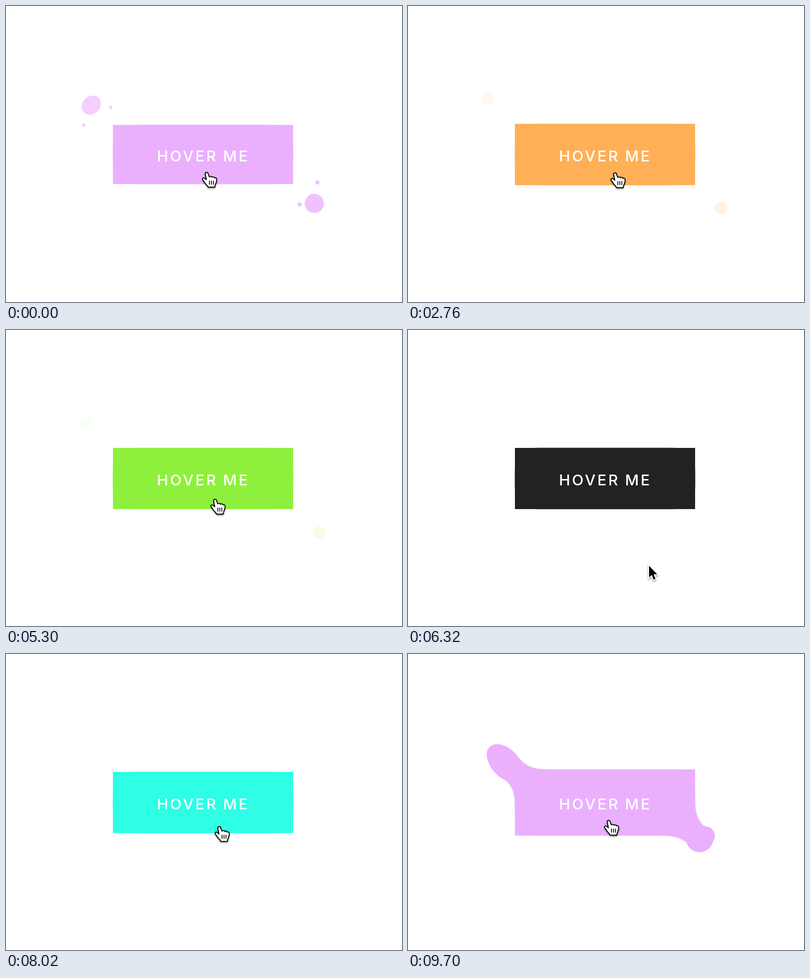
These frames come from a looping animation (800x600 px, 9.72 s). An HTML page:

```html
<!DOCTYPE html>
<html lang="en">
<head>
<meta charset="utf-8">
<title>Bubble button</title>
<style>
  html, body { margin: 0; width: 100%; height: 100%; overflow: hidden; background: #fff; }
  svg { display: block; width: 800px; height: 600px; }
  .label { font: 500 30.5px Inter, "Open Sans", sans-serif; letter-spacing: 3.6px; word-spacing: -1px; fill: #fff; }
  .cursor { filter: drop-shadow(0 2px 1.5px rgba(0, 0, 0, .4)); }
</style>
</head>
<body>
<svg viewBox="0 0 800 600" xmlns="http://www.w3.org/2000/svg">
  <defs>
    <filter id="goo" filterUnits="userSpaceOnUse" x="34" y="53" width="728" height="496" color-interpolation-filters="sRGB">
      <feGaussianBlur in="SourceGraphic" stdDeviation="22" result="blur"/>
      <feColorMatrix in="blur" values="1 0 0 0 0  0 1 0 0 0  0 0 1 0 0  0 0 0 19 -9" result="goo"/>
      <feComposite in="SourceGraphic" in2="goo"/>
    </filter>
  </defs>
  <g id="blob" filter="url(#goo)">
    <rect id="plate" x="216" width="364"/>
  </g>
  <text class="label" x="305" y="314.5">HOVER ME</text>
  <g id="cursor" class="cursor">
    <path id="arrow" d="M0 0V23.5L5.4 18.6 9.2 28 13 26.4 9.2 17.2H16.4Z" stroke="#fff" stroke-width="4" paint-order="stroke"/>
    <g id="hand" fill="#fff" stroke="#000" stroke-width="1.9" stroke-linejoin="round" stroke-linecap="round">
      <path d="M-2.5 4C-3 -.5 2.5 -1.2 3.3 2.8L5.8 9.5C7 7.8 11 8 11.3 10.3C13 8.6 16 9.3 16.3 11.5C18.5 10.3 20.6 11.8 20.6 14C20.8 18 20 21 18.4 24C17.2 26 17 28 16.8 30.3H3.5C2.5 27.5 -.5 25 -2.5 22.5C-4.5 20 -6 17.5 -7.5 15.5C-9 13 -7 10.8 -4.8 11.6C-3 12.3 -2 13.5 -.2 15.3Z"/>
      <path d="M6 17.5v7M10 17.5v7M14 17.5v7" stroke-width="1.6"/>
    </g>
  </g>
</svg>
<script>
const LOOP = 9720, SLOW_FROM = 9500, SLOW = .47;
const UNIT = 2.2, MID_Y = 301, HEIGHT = 124;
const DARK = [34, 34, 34], PINK = [234, 176, 253];

// spot: where the hand stays; rest: where the arrow goes after leaving
const hovers = [
  { start: -586, leave: 704, rate: 2.6, color: PINK, spot: [405, 337], rest: [488, 496] },
  { start: 1994, leave: 3178, rate: 2.6, color: [255, 176, 86], spot: [418, 338], rest: [498, 504] },
  { start: 4385, leave: 5724, rate: 2.25, color: [142, 240, 60], spot: [422, 343], rest: [487, 478] },
  { start: 7017, leave: 8150, rate: 2.6, color: [45, 254, 228], spot: [429, 346], rest: [490, 494] },
  { start: 9125, leave: Infinity, rate: 2.6, color: PINK, spot: [405, 337], rest: [405, 337] }
];

const corners = [
  { home: [258, 279], dir: -1, reach: 25, fling: 10, delay: 0, span: 1.2, stretch: 1, turn: -45 },
  { home: [538, 323], dir: 1, reach: 30, fling: 7, delay: .2, span: 1.1, stretch: 0, turn: 45 }
];

const $ = id => document.getElementById(id);
const clamp = v => Math.min(1, Math.max(0, v));
const mix = (a, b, p) => a + (b - a) * p;
const mixAll = (a, b, p) => a.map((v, i) => mix(v, b[i], p));
const tween = (t, start, span) => 1 - (1 - clamp((t - start) / span)) ** 2;

function glide(t, start, span) {
  const p = clamp((t - start) / span);
  return p * p * (3 - 2 * p);
}

// fast, slow in the middle, fast again
function slowMo(v) {
  const p = clamp(v), r = p + (.5 - p) * .7;
  if (p < .45) return r - (1 - p / .45) ** 4 * r;
  if (p > .55) return r + (p - r) * ((p - .55) / .45) ** 4;
  return r;
}

function elastic(p) {
  const shift = .4 / (2 * Math.PI) * Math.asin(1 / 1.2);
  return 1.2 * 2 ** (-10 * p) * Math.sin((p - shift) * 2 * Math.PI / .4) + 1;
}

// One big drop and two small ones; push is the burst, drift the slow fade
function addDrops(c) {
  const f = c.fling;
  c.drops = [
    { push: [-6, 2.5], drift: [5, 15], size: [.2, .2], end: 0 },
    { push: [f, f - 3.5], drift: [f, f], size: [mix(.8, 1, c.stretch), .8], end: .4 },
    { push: [15, -6], drift: [15, -5], size: [.2, .2], end: 0, early: c.dir > 0 }
  ];
  for (const d of c.drops) {
    d.el = document.createElementNS("http://www.w3.org/2000/svg", "circle");
    d.el.setAttribute("r", 12.5 * UNIT);
    $("blob").append(d.el);
  }
}
corners.forEach(addDrops);

function placeDrop(d, c, t) {
  const burst = d.early ? c.span - .1 : c.span;
  const k = slowMo((d.early ? Math.min(t, burst + .015) : t) / c.span);
  const a = tween(t, burst, .1), b = tween(t, c.span + .1, 1);
  const at = c.home.map((v, i) => v + c.dir * UNIT * (c.reach * k + d.push[i] * a + d.drift[i] * b));
  const size = mixAll(mixAll([1, 1 + c.stretch * k], d.size, a), [d.end, d.end], b);
  d.el.setAttribute("transform", `translate(${at}) rotate(${c.turn}) scale(${size})`);
  d.el.setAttribute("opacity", 1 - b);
}

function drawBlob(t) {
  let scale = 1 + .1 * tween(t, .1, .8);
  if (t > 1.2) scale = 1.1 - .1 * (t < 3 ? elastic((t - 1.2) / 1.8) : 1);
  $("plate").setAttribute("y", MID_Y - HEIGHT * scale / 2);
  $("plate").setAttribute("height", HEIGHT * scale);
  for (const c of corners)
    for (const d of c.drops) placeDrop(d, c, t - c.delay);
}

// Each hover pulls the pointer to its spot, then lets it go to rest
function cursorAt(ms) {
  return hovers.reduce((at, h) =>
    mixAll(mixAll(at, h.spot, glide(ms, h.start - 514, 620)), h.rest, glide(ms, h.leave - 204, 800)),
    hovers[0].spot);
}

function draw(ms) {
  const h = hovers.filter(v => v.start <= ms).pop();
  const clock = Math.min(ms, SLOW_FROM) + SLOW * Math.max(0, ms - SLOW_FROM);
  drawBlob((clock - h.start) / 1000 * h.rate);

  const tint = tween(ms, h.start, 100) - tween(ms, h.leave, 100);
  $("blob").setAttribute("fill", `rgb(${mixAll(DARK, h.color, tint).map(Math.round)})`);

  const over = ms < h.leave;
  $("cursor").setAttribute("transform", `translate(${cursorAt(ms)})`);
  $("hand").setAttribute("visibility", over ? "visible" : "hidden");
  $("arrow").setAttribute("visibility", over ? "hidden" : "visible");
}

const begin = performance.now();
function tick() {
  const ms = (performance.now() - begin) % LOOP;
  draw(ms - ms % 20);
  requestAnimationFrame(tick);
}
tick();
</script>
</body>
</html>
```
